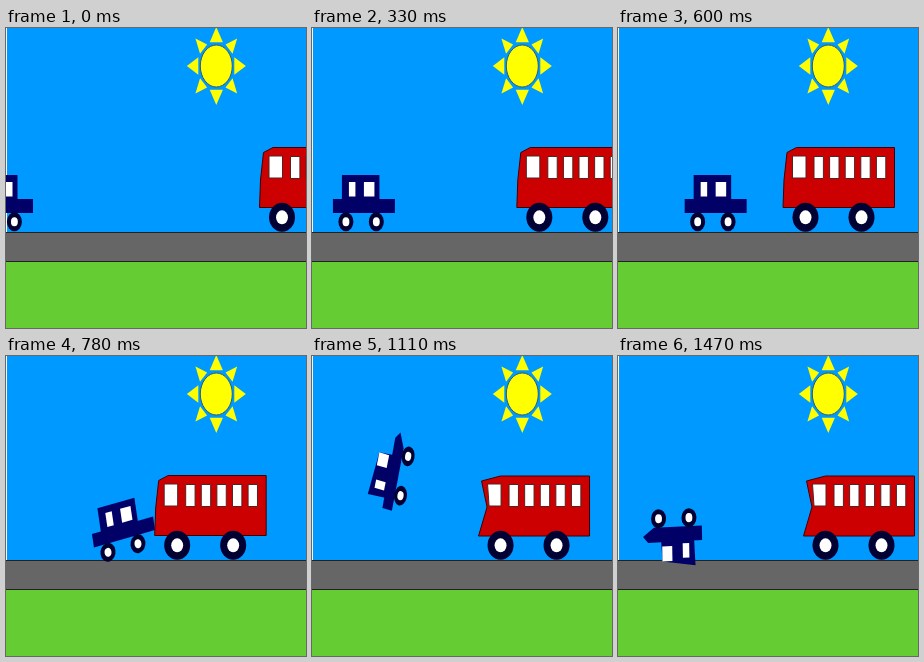
These frames come from a looping animation (300 by 300 pixels, 2250 ms). An HTML page with a canvas:

```html
<!DOCTYPE html>
<html lang="en">
<head>
<meta charset="utf-8">
<title>Car and bus</title>
<style>
  html, body { margin: 0; width: 100%; height: 100%; overflow: hidden; }
  canvas { display: block; width: 100vw; height: 100vh; }
</style>
</head>
<body>
<canvas id="stage" width="300" height="300"></canvas>
<script>
const ctx = document.getElementById('stage').getContext('2d');
const STEP = 30, LAST = 49, LOOP = 2250, HIT = 24;
const NAVY = '#000066', TYRE = '#000033', SUN = '#ffff00';

// Car after the crash: step, x, y, degrees
const FLIGHT = [
  [HIT, 118, 178, 0], [26, 117.5, 176, -16], [37, 82, 117, -79],
  [44, 64, 170, -161], [LAST, 56, 178, -182]
];

const mix = (a, b, k) => a + (b - a) * k;
const ramp = (a, b, v) => Math.min(1, Math.max(0, (v - a) / (b - a)));
const box = (l, t, r, b) => [[l, t], [r, t], [r, b], [l, b]];
const morph = (from, to, k) =>
  from.map(([x, y], i) => [mix(x, to[i][0], k), mix(y, to[i][1], k)]);

function poly(points, fill, stroke) {
  ctx.beginPath();
  points.forEach(([x, y]) => ctx.lineTo(x, y));
  ctx.closePath();
  ctx.fillStyle = fill;
  ctx.fill();
  if (stroke) {
    ctx.strokeStyle = stroke;
    ctx.stroke();
  }
}

function oval(x, y, rx, ry, fill) {
  ctx.beginPath();
  ctx.ellipse(x, y, rx, ry, 0, 0, Math.PI * 2);
  ctx.fillStyle = fill;
  ctx.fill();
}

function wheel(x, y, rx, ry) {
  oval(x, y, rx, ry, TYRE);
  oval(x, y, rx * 0.46, ry * 0.48, '#fff');
}

function band(y, h, fill) {
  ctx.fillStyle = fill;
  ctx.fillRect(0, y, 300, h);
}

function drawSun() {
  oval(210.3, 38, 16, 21, SUN);
  ctx.strokeStyle = '#2f5f66';
  ctx.stroke();
  ctx.save();
  ctx.translate(210.3, 38);
  ctx.scale(1, 1.32);
  for (let i = 0; i < 8; i++) {
    const half = i % 2 ? 5 : 6.6;
    poly([[29.5, 0], [18, -half], [18, half]], SUN);
    ctx.rotate(Math.PI / 4);
  }
  ctx.restore();
}

function drawScene() {
  band(0, 204, '#0099ff');
  band(204, 29, '#666666');
  band(204, 1, '#222');
  band(233, 1, '#222');
  band(234, 66, '#66cc33');
  ctx.fillStyle = '#fff';
  ctx.fillRect(0, 0, 1, 204);
  drawSun();
}

function drawBus(step) {
  const x = step <= HIT
    ? mix(276, 169.8, step / HIT)
    : mix(169.6, 207.5, ramp(HIT + 1, LAST, step));
  const dent = ramp(26, 34, step);
  ctx.save();
  ctx.translate(x, 0);
  poly(morph(
    [[89, 119.5], [-9, 119.5], [-18.5, 124.5], [-21.5, 152], [-22.5, 179.5], [89, 179.5]],
    [[89, 120], [0, 120], [-19, 125], [-13.5, 151], [-22, 180], [89, 180]], dent
  ), '#cc0000', '#400000');
  const glass = box(-13, 128, 0.5, 150);
  glass[3][0] += 1.5 * dent;
  poly(glass, '#fff', '#522');
  for (let i = 0; i < 5; i++) {
    const left = 8.5 + 15.6 * i;
    poly(box(left, 128.5, left + 9.4, 150.5), '#fff', '#522');
  }
  for (const wx of [0, 56]) wheel(wx, 189.3, 13, 14.5);
  ctx.restore();
}

function carPose(step) {
  if (step <= HIT) return [mix(-4, 118, step / HIT), 178, 0];
  const i = FLIGHT.findIndex(key => key[0] >= step);
  const a = FLIGHT[i - 1], b = FLIGHT[i];
  const k = ramp(a[0], b[0], step);
  return [1, 2, 3].map(n => mix(a[n], b[n], k));
}

function drawCar(step) {
  const [x, y, deg] = carPose(step);
  const k = ramp(26, 37, step);
  const turn = deg * Math.PI / 180;
  // The car grows long and thin, and leans, as it stands on end
  const pull = 0.33 * Math.sin(turn) ** 2;
  const side = turn - 0.25 * Math.sin(2 * turn);
  const along = 1 + pull, across = 1 - pull;
  ctx.save();
  ctx.transform(
    along * Math.cos(turn), along * Math.sin(turn),
    -across * Math.sin(side), across * Math.cos(side), x, y);
  poly(morph(box(-22, -31, 15.5, -6),
    [[-21, -32], [12, -27], [13, -6], [-20, -6]], k), NAVY);
  poly(morph(
    [[-31, -7], [31, -7], [31, 0], [31, 7], [-31, 7]],
    [[-28, -7], [26, -8], [31, -2], [20, 7], [-28, 7.5]], k), NAVY);
  poly(box(-15, -24, -8.5, -9.5), '#fff');
  poly(morph(box(0, -24, 10.5, -9.5), box(2, -27, 12, -12), k), '#fff');
  for (const s of [-1, 1]) wheel(15.2 * s - 2.8 * (1 - k), 15.8, 7.5, 9.5);
  ctx.restore();
}

function draw(now) {
  const step = Math.min(LAST, Math.floor((now % LOOP) / STEP));
  drawScene();
  drawCar(step);
  drawBus(step);
}

let start;
function tick(now) {
  if (start === undefined) start = now;
  draw(now - start);
  requestAnimationFrame(tick);
}
draw(0);
requestAnimationFrame(tick);
</script>
</body>
</html>
```
